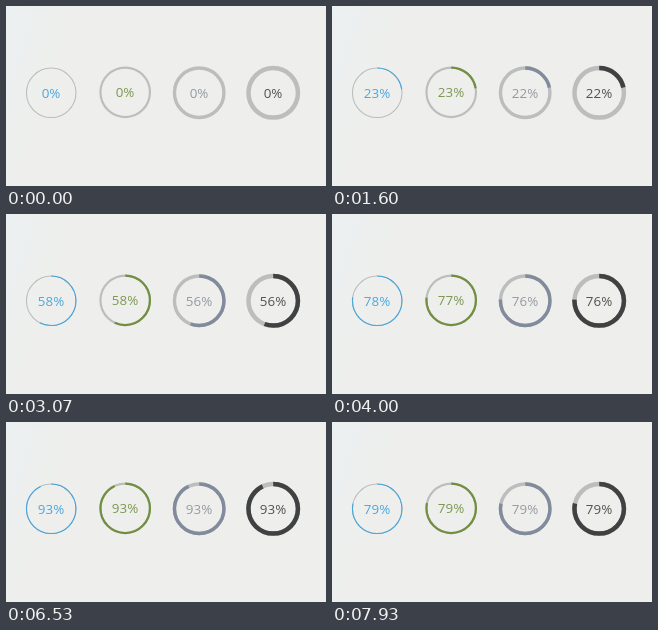
Animation of 320x180 px, one loop 8 s. Source, as an HTML page with a canvas:

```html
<!DOCTYPE html>
<html lang="en">
<head>
<meta charset="utf-8">
<title>Progress rings</title>
<style>
  html, body { margin: 0; width: 100%; height: 100%; overflow: hidden; background: #eeefed; }
  canvas { display: block; width: 320px; height: 180px; }
</style>
</head>
<body>
<canvas id="stage"></canvas>
<script>
const W = 320, H = 180, LOOP = 8000, RADIUS = 24.75;
const FALL_START = 6527, FALL_TIME = 1403;
const canvas = document.getElementById('stage');
const ctx = canvas.getContext('2d');
const dpr = window.devicePixelRatio || 1;
canvas.width = W * dpr;
canvas.height = H * dpr;
ctx.scale(dpr, dpr);

// lead: how many percent a ring runs ahead in mid-rise
const rings = [
  { y: 86.8, line: 1.1, lead: 2,    color: '#46a6dc', text: '#4aa7dd' },
  { y: 86.3, line: 2.2, lead: 1.35, color: '#728f40', text: '#7c9653' },
  { y: 86.8, line: 3.4, lead: 0,    color: '#828b9b', text: '#959aa1' },
  { y: 86.8, line: 4.5, lead: 0,    color: '#3f4142', text: '#505152' }
];
rings.forEach((ring, i) => ring.x = 45.2 + 74 * i);

// key points of the rise: [time, percent]
const rise = [[100, 0], [1000, 6.3], [2200, 36.8], [4000, 75.8], [5200, 96.5], [5700, 100]];

function risen(t) {
  if (t <= rise[0][0]) return 0;
  const i = rise.findIndex(([time]) => time > t);
  if (i < 0) return 100;
  const [t0, v0] = rise[i - 1], [t1, v1] = rise[i];
  return v0 + (v1 - v0) * (t - t0) / (t1 - t0);
}

function percentAt(t, lead) {
  if (t >= FALL_START) return 93 - 14.6 * ((t - FALL_START) / FALL_TIME) ** 1.4;
  const v = risen(t);
  return v + lead * Math.sin(Math.PI * v / 100);
}

const backdrop = ctx.createLinearGradient(0, 0, 60, 20);
backdrop.addColorStop(0, '#ebf0f1');
backdrop.addColorStop(1, '#eeefed');

function strokeArc(ring, part, color) {
  const start = -Math.PI / 2;
  ctx.beginPath();
  ctx.arc(ring.x, ring.y, RADIUS, start, start + part * 2 * Math.PI);
  ctx.lineWidth = ring.line;
  ctx.strokeStyle = color;
  ctx.stroke();
}

function drawRing(ring, percent) {
  strokeArc(ring, 1, '#bcbebd');
  if (percent > 0) strokeArc(ring, percent / 100, ring.color);
  ctx.fillStyle = ring.text;
  const shown = Math.min(100, Math.ceil(percent - 1e-6));
  ctx.fillText(Math.max(0, shown) + '%', ring.x - 0.2, ring.y + 4.7);
}

function draw(t) {
  ctx.fillStyle = backdrop;
  ctx.fillRect(0, 0, W, H);
  ctx.font = '13.4px "Open Sans", "Noto Sans", sans-serif';
  ctx.textAlign = 'center';
  ctx.textBaseline = 'alphabetic';
  for (const ring of rings) drawRing(ring, percentAt(t, ring.lead));
}

const begin = performance.now();
function tick() {
  draw((performance.now() - begin) % LOOP);
  requestAnimationFrame(tick);
}
tick();
</script>
</body>
</html>
```
